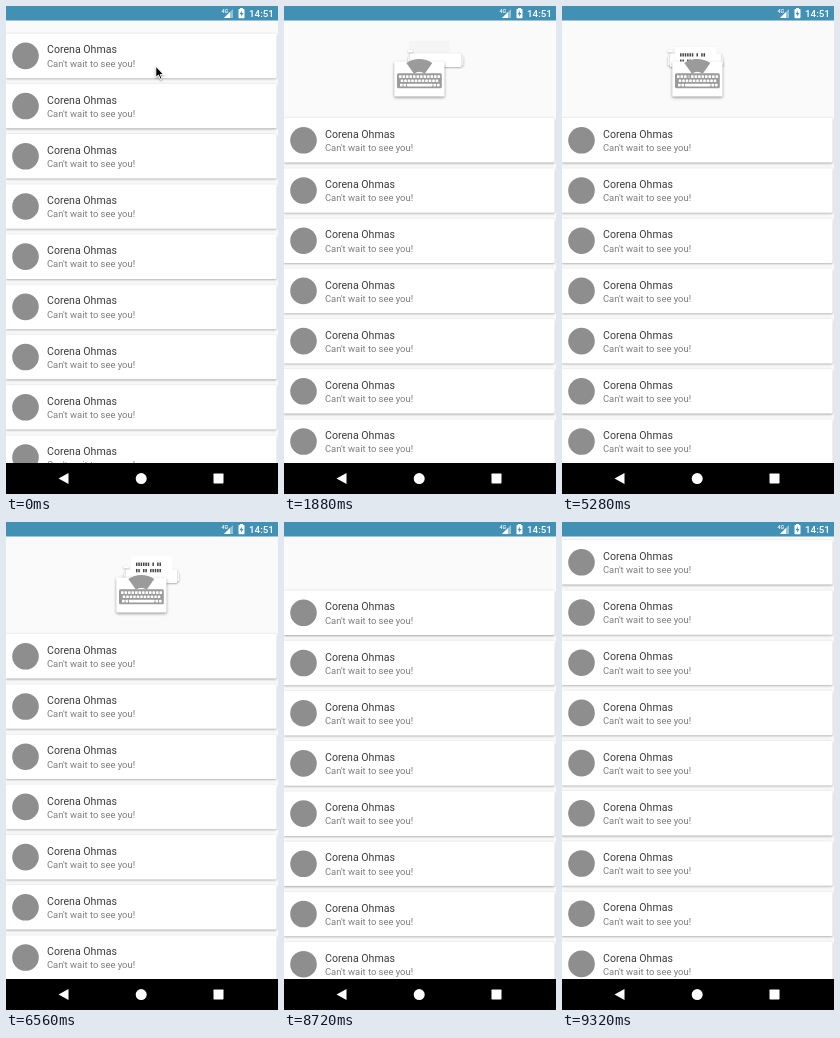
Animation, 272 px wide and 488 px high, one loop 9.56 s. Source, as an HTML page with a canvas:

```html
<!DOCTYPE html>
<html lang="en">
<head>
<meta charset="utf-8">
<title>Pull to refresh</title>
<style>
html, body { margin: 0; width: 272px; height: 488px; overflow: hidden; background: #fafafa; }
canvas { display: block; }
</style>
</head>
<body>
<canvas id="stage" width="272" height="488"></canvas>
<script>
const ctx = document.getElementById('stage').getContext('2d');
const LOOP = 9560, REST_Y = 40.5, PULL = 94, ROW = 50.2;
const GREY = '#9b9b9b', BAR = '#4291b5';
const CARRIAGE = { left: 107.7, right: 124, width: 55.5, pitch: 2.6 };
const LINE_STARTS = [1840, 4480, 6840], KEY_MS = 113, KEYS = 13;
const RETURNS = [3640, 6160], RETURN_MS = 560;
const LINES = ['###### # ##', '## ## #####', '#### ## ###'];

const clamp = (v, lo = 0, hi = 1) => Math.min(hi, Math.max(lo, v));
const mix = (a, b, p) => a + (b - a) * p;
const easeInOut = p => (1 - Math.cos(Math.PI * clamp(p))) / 2;

function box(x, y, w, h, color, radius = 0) {
  ctx.fillStyle = color;
  ctx.beginPath();
  ctx.roundRect(x, y, w, h, radius);
  ctx.fill();
}

function shape(color, points) {
  ctx.fillStyle = color;
  ctx.beginPath();
  points.forEach(([x, y]) => ctx.lineTo(x, y));
  ctx.fill();
}

function disc(x, y, r, color) {
  ctx.fillStyle = color;
  ctx.beginPath();
  ctx.arc(x, y, r, 0, 7);
  ctx.fill();
}

function label(text, x, y, font, color) {
  ctx.font = font + ' Roboto, sans-serif';
  ctx.fillStyle = color;
  ctx.fillText(text, x, y);
}

function withShadow(alpha, blur, dy, draw) {
  ctx.save();
  ctx.shadowColor = `rgba(0,0,0,${alpha})`;
  ctx.shadowBlur = blur;
  ctx.shadowOffsetY = dy;
  draw();
  ctx.restore();
}

const dragged = t => (Math.min(t, 520) / 200) ** 1.17;

function pullOffset(t) {
  if (t < 520) return 9.5 + 27.5 * dragged(t);
  if (t < 8620) return PULL;
  const left = PULL * (1 - clamp((t - 8620) / 540)) ** 3;
  return Math.max(left, t < 9320 ? 1 : 0);
}

// Number of keys struck on a line so far
const struck = (t, line) => clamp(Math.floor((t - LINE_STARTS[line]) / KEY_MS), 0, KEYS);

function carriageX(t) {
  const { left, right, pitch } = CARRIAGE;
  if (t < LINE_STARTS[0]) return mix(left, right, easeInOut((t - 1120) / RETURN_MS));
  const end = right - KEYS * pitch;
  for (const start of RETURNS) {
    if (t >= start && t < start + RETURN_MS) return mix(end, right, easeInOut((t - start) / RETURN_MS));
  }
  const line = RETURNS.filter(start => t >= start).length;
  return right - struck(t, line) * pitch;
}

function drawPaper(t, x) {
  const feed = RETURNS.reduce((sum, start) => sum + clamp((t - start) / RETURN_MS * 3), 0);
  const top = 47.5 - 6.6 * feed;
  withShadow(.12, 1.5, .3, () => box(x, top, 41, 61 - top, '#fff'));
  LINES.forEach((line, row) => {
    const count = struck(t, row);
    [...line].forEach((mark, i) => {
      if (mark === '#' && i < count) box(x + 5 + i * 2.35, top + 6.3 + row * 6.3, 1.5, 3.4, '#444');
    });
  });
}

function drawKeyboard(t) {
  box(113, 67.3, 44.8, 15, GREY, 1.5);
  const line = LINE_STARTS.findLastIndex(start => t >= start);
  const beat = line < 0 ? -1 : (t - LINE_STARTS[line]) / KEY_MS;
  const down = beat >= 1 && beat < KEYS + 1 && beat % 1 < .5;
  const pressed = down ? Math.floor(beat) * 7 % 23 : -1;
  for (let i = 0; i < 23; i++) {
    const row = i < 12 ? 0 : 1;
    const x = row ? 116.7 + (i - 12) * 3.5 : 115 + i * 3.5;
    box(x, 69.2 + row * 4.2, 2.6, 2.7, i === pressed ? '#c4c4c4' : '#fff', .6);
  }
  for (const x of [116, 119.5, 149.5, 153]) box(x, 77.7, 2.6, 2.7, '#fff', .6);
  box(123, 77.7, 25.5, 2.7, '#fff', .6);
}

function drawTypewriter(t, alpha) {
  ctx.save();
  ctx.globalAlpha = alpha;
  if (t < 1960) box(125, 35, 41, 12, '#f5f5f5');
  const x = carriageX(t), w = CARRIAGE.width;
  withShadow(.35, 2, .8, () => {
    box(x, 50.5, 3, 9, '#fff', .5);
    box(x + w - 3, 50.5, 3, 9, '#fff', .5);
    box(x, 44, 5, 2.5, '#fff', .5);
    box(x + 2, 47.5, w - 4, 13.5, '#fff', .5);
  });
  drawPaper(t, x + 7.25);
  withShadow(.4, 3, 1.2, () => box(110.3, 55.5, 50.2, 35, '#fff', 1));
  ctx.strokeStyle = GREY;
  ctx.lineWidth = 13;
  ctx.beginPath();
  ctx.arc(135.3, 75, 15.6, -Math.PI * .7, -Math.PI * .3);
  ctx.stroke();
  drawKeyboard(t);
  ctx.restore();
}

function drawRow(y) {
  withShadow(.34, 2.4, .8, () => box(-.5, y - 22.5, 271.2, 44.6, '#fff', 1.5));
  disc(19.5, y - .2, 13.3, '#8e8e8e');
  label('Corena Ohmas', 41, y - 2.6, '10.6px', '#3c3c3c');
  label('Can\'t wait to see you!', 41, y + 10.6, '9.42px', '#7c7c7c');
}

function drawBars() {
  box(0, 0, 272, 14.6, BAR);
  label('4G', 215.6, 7, 'italic 500 5.4px', '#fff');
  shape('rgba(255,255,255,.45)', [[218, 12], [227, 12], [227, 3]]);
  shape('#fff', [[218, 12], [224, 12], [224, 6]]);
  box(234, 2, 3, 2, '#fff');
  box(232.5, 3, 6, 9.3, '#fff', .7);
  shape(BAR, [[236, 4.5], [233.6, 8.2], [235.2, 8.2], [235, 10.8], [237.4, 7.1], [235.8, 7.1]]);
  label('14:51', 243, 11.3, '500 9.8px', '#fff');

  box(0, 457, 272, 31, '#000');
  shape('#fff', [[52.5, 472.5], [62.5, 467], [62.5, 478]]);
  disc(135.2, 472.6, 5.5, '#fff');
  box(207.5, 467.5, 10, 10, '#fff', .7);
}

function drawCursor(t) {
  if (t >= 960) return;
  const exit = clamp((t - 760) / 200);
  ctx.save();
  ctx.translate(mix(150.3, -8, exit), mix(61.2 + 38 * dragged(t), 424, exit));
  withShadow(.4, 2, 1, () => {
    shape('#fff', [[-.8, -1.8], [-.8, 11], [2, 8.6], [4, 12.8], [6.2, 11.8], [4.4, 7.8], [8.2, 7.6]]);
  });
  shape('#000', [[0, 0], [0, 9.2], [2.3, 7.2], [4.4, 11.4], [5.2, 11], [3.3, 6.9], [6.2, 6.8]]);
  ctx.restore();
}

function draw(t) {
  const offset = pullOffset(t);
  box(0, 0, 272, 488, '#fafafa');
  const alpha = clamp((offset - 60) / 30);
  if (alpha > 0) drawTypewriter(t, alpha);
  for (let y = REST_Y + offset; y < 485; y += ROW) drawRow(y);
  drawBars();
  drawCursor(t);
}

function tick() {
  draw(performance.now() % LOOP);
  requestAnimationFrame(tick);
}
tick();
</script>
</body>
</html>
```
